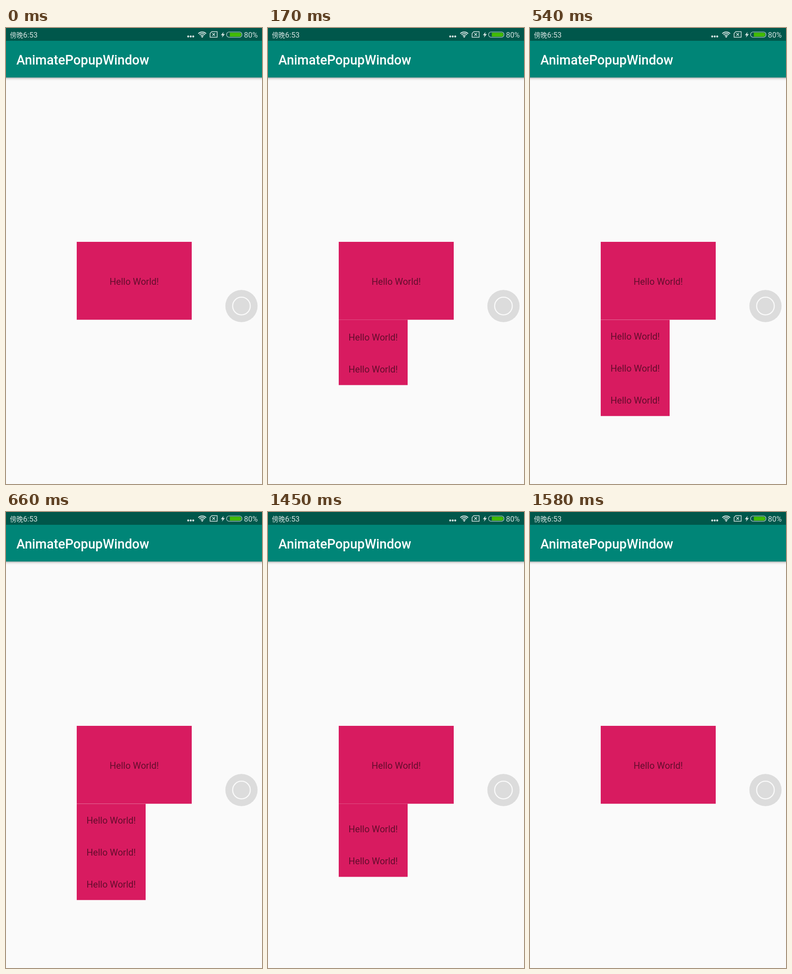
Recreate the animation shown at these times as an HTML page with a canvas. Size 561 px wide and 998 px high, loop 1780 ms.

```html
<!DOCTYPE html>
<html lang="zh-CN">
<head>
<meta charset="utf-8">
<title>Popup window</title>
<style>
  html, body { margin: 0; width: 100%; height: 100%; overflow: hidden; background: #fafafa; }
  canvas { display: block; width: 561px; height: 998px; }
</style>
</head>
<body>
<canvas id="stage" width="561" height="998"></canvas>
<script>
const ctx = document.getElementById('stage').getContext('2d');
const LOOP = 1780;
const PINK = '#d81b60';
const STATUS = '#d5e3e1';
const MENU = { x: 155, y: 638.5, w: 151, h: 211, row: 70.2 };
const OPEN = { start: -16, length: 226, steps: [40, 80, 130, 170, 210] };
const CLOSE = { start: 1331, length: 242, steps: [1370, 1410, 1450, 1500, 1540, 1580] };

function rect(x, y, w, h, color) {
  ctx.fillStyle = color;
  ctx.fillRect(x, y, w, h);
}

function disc(x, y, r, color) {
  ctx.fillStyle = color;
  ctx.beginPath();
  ctx.arc(x, y, r, 0, Math.PI * 2);
  ctx.fill();
}

function pill(x, y, w, h, r) {
  ctx.beginPath();
  ctx.roundRect(x, y, w, h, r);
}

function polygon(points) {
  ctx.beginPath();
  points.forEach(([x, y]) => ctx.lineTo(x, y));
  ctx.closePath();
}

function text(str, x, y, font, color, align = 'left') {
  ctx.font = font;
  ctx.fillStyle = color;
  ctx.textAlign = align;
  ctx.fillText(str, x, y);
}

function hello(x, y) {
  text('Hello World!', x, y, '20px Roboto, sans-serif', 'rgba(0,0,0,0.54)', 'center');
}

function wifi(x, y) {
  const left = -Math.PI * 0.76, right = -Math.PI * 0.24;
  ctx.lineWidth = 2;
  for (const r of [4.6, 8.2, 11.8]) {
    ctx.beginPath();
    ctx.arc(x, y, r, left, right);
    ctx.stroke();
  }
  disc(x, y - 1.2, 1.8, STATUS);
}

function statusBar() {
  rect(0, 0, 561, 28, '#00574b');
  text('傍晚', 8.5, 20.5, '14.5px "Noto Sans CJK SC", "Noto Sans CJK", sans-serif', STATUS);
  text('6:53', 37.5, 21, '16.5px Roboto, sans-serif', STATUS);
  text('80%', 521.5, 21, '16.3px Roboto, sans-serif', STATUS);
  for (let i = 0; i < 3; i++) disc(399.3 + i * 5.5, 18.5, 2.2, STATUS);

  ctx.strokeStyle = STATUS;
  wifi(430, 20.5);

  // SIM card
  ctx.lineWidth = 1.5;
  polygon([[451, 8], [462.7, 8], [462.7, 20.2], [447.3, 20.2], [447.3, 11.8]]);
  ctx.stroke();
  ctx.beginPath();
  ctx.moveTo(452.3, 11.3); ctx.lineTo(458, 17);
  ctx.moveTo(458, 11.3); ctx.lineTo(452.3, 17);
  ctx.stroke();

  // Charging bolt and battery
  ctx.fillStyle = STATUS;
  polygon([[476.8, 8.5], [471, 15.8], [474.6, 15.8], [473.3, 21], [479.6, 13.3], [475.7, 13.3]]);
  ctx.fill();
  ctx.lineWidth = 1.1;
  pill(483.5, 8.8, 33.5, 11.4, 5);
  ctx.stroke();
  ctx.fillStyle = '#43bc00';
  pill(490.5, 10.3, 25, 8.4, [0, 3.8, 3.8, 0]);
  ctx.fill();
}

function appBar() {
  const shade = ctx.createLinearGradient(0, 108, 0, 116);
  shade.addColorStop(0, 'rgba(0,0,0,0.32)');
  shade.addColorStop(0.3, 'rgba(0,0,0,0.14)');
  shade.addColorStop(0.6, 'rgba(0,0,0,0.04)');
  shade.addColorStop(1, 'rgba(0,0,0,0)');
  rect(0, 108, 561, 8, shade);
  rect(0, 28, 561, 80.3, '#008577');
  text('AnimatePopupWindow', 22.8, 80, '500 28.57px Roboto, sans-serif', '#fff');
}

function menu(open) {
  if (open <= 0) return;
  ctx.save();
  ctx.beginPath();
  ctx.rect(MENU.x, MENU.y, MENU.w, MENU.h);
  ctx.clip();
  ctx.translate(0, Math.round((open - 1) * MENU.h));
  rect(MENU.x, MENU.y, MENU.w, MENU.h, PINK);
  for (let i = 0; i < 3; i++) hello(MENU.x + MENU.w / 2, 682 + i * MENU.row);
  ctx.restore();
}

function touchButton() {
  disc(516, 608.5, 35.3, '#dcdcdc');
  ctx.strokeStyle = '#fafafa';
  ctx.lineWidth = 2.3;
  ctx.beginPath();
  ctx.arc(516, 608.5, 19.3, 0, Math.PI * 2);
  ctx.stroke();
}

function slide(t, { start, length, steps }) {
  const time = steps.filter(s => s <= t).pop();
  if (time === undefined) return 0;
  return Math.min(1, (time - start) / length) ** 2;
}

function draw(t) {
  rect(0, 0, 561, 998, '#fafafa');
  statusBar();
  appBar();
  rect(155, 468, 252, 170.5, PINK);
  hello(281, 561.5);
  menu(slide(t, OPEN) - slide(t, CLOSE));
  touchButton();
}

const began = performance.now();
function tick() {
  draw((performance.now() - began) % LOOP);
  requestAnimationFrame(tick);
}
tick();
</script>
</body>
</html>
```
